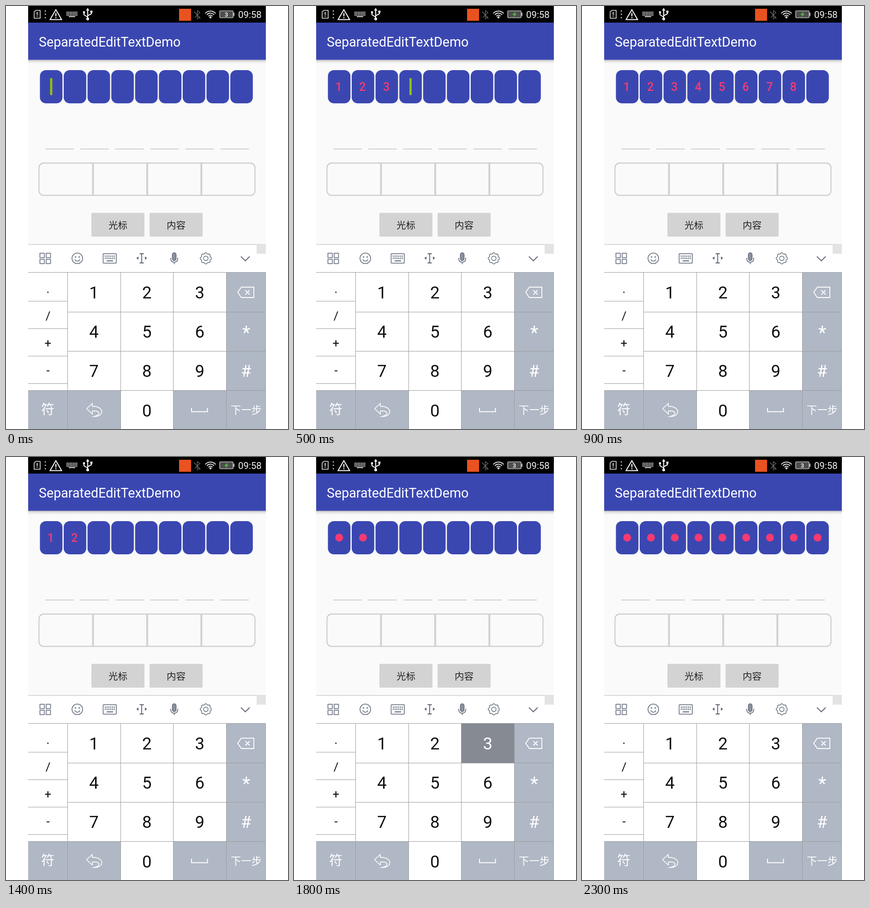
Recreate the animation shown at these times as an HTML page with a canvas. Size 611 by 917 pixels, loop 2.4 s.

```html
<!DOCTYPE html>
<html lang="zh">
<head>
<meta charset="utf-8">
<title>SeparatedEditTextDemo</title>
<style>
html, body { margin: 0; width: 100%; height: 100%; overflow: hidden; background: #fff; }
canvas { display: block; }
</style>
</head>
<body>
<canvas id="stage" width="611" height="917"></canvas>
<script>
const ctx = document.getElementById('stage').getContext('2d');
const LOOP = 2400, STEP = 100;
const BLUE = '#3b47b1', PINK = '#f93a70', GREEN = '#8fc400', KEY = '#b0b8c5', ICON = '#596273';
const LATIN = 'Roboto, sans-serif';
const HAN = '"Noto Sans CJK SC", "Noto Sans CJK", sans-serif';

// one character per step: how many cells are filled
const COUNTS = '001123457897422222246789';
const MASK_FROM = 16;
const PRESSED = { 1: '1', 6: '4', 8: '7', 11: 'del', 15: '内容', 18: '3', 22: '8' };
const LEVEL_STEPS = [0, 1, 2, 7, 11, 12, 17, 18, 22, 23];

function rect(x, y, w, h, color) {
  ctx.fillStyle = color;
  ctx.fillRect(x, y, w, h);
}

function round(x, y, w, h, r, fill, stroke, width = 1) {
  ctx.beginPath();
  ctx.roundRect(x, y, w, h, r);
  paint(fill, stroke, width);
}

function circle(x, y, r, fill, stroke, width) {
  ctx.beginPath();
  ctx.arc(x, y, r, 0, Math.PI * 2);
  paint(fill, stroke, width);
}

function path(d, fill, stroke, width = 1) {
  const p = new Path2D(d);
  if (fill) { ctx.fillStyle = fill; ctx.fill(p); }
  if (stroke) { ctx.strokeStyle = stroke; ctx.lineWidth = width; ctx.stroke(p); }
}

function paint(fill, stroke, width = 1) {
  if (fill) { ctx.fillStyle = fill; ctx.fill(); }
  if (stroke) { ctx.strokeStyle = stroke; ctx.lineWidth = width; ctx.stroke(); }
}

function text(s, x, y, size, color, font = LATIN, align = 'center', weight = 400) {
  ctx.font = `${weight} ${size}px ${font}`;
  ctx.textAlign = align;
  ctx.fillStyle = color;
  ctx.fillText(s, x, y);
}

function drawStatus(step) {
  rect(48, 0, 515, 36, '#000');
  path('M64.5 9.5H74V26.5H61V13Z', null, '#eee', 1.5);
  rect(66.6, 13, 1.8, 6.5, '#fff');
  rect(66.6, 21, 1.8, 2, '#fff');
  for (let i = 0; i < 3; i++) rect(84, 9.5 + i * 7.3, 2.4, 2.4, '#ddd');
  path('M108 8L120.5 29.5H95.5Z', null, '#fff', 2);
  rect(107, 15, 2.2, 7.5, '#fff');
  rect(107, 24.2, 2.2, 2.3, '#fff');
  for (let r = 0; r < 3; r++)
    for (let c = 0; c < 7; c++) rect(131 + c * 3.5, 12.5 + r * 3.2, 2.5, 2, '#ddd');
  rect(136, 22, 14, 2, '#ddd');

  path('M177 8V28M177 24L169 19V14M177 21L185 17V13', null, '#fff', 2);
  path('M177 4L180.5 10H173.5Z', '#fff');
  circle(177, 28, 3, '#fff');
  circle(169, 13.5, 2.3, '#fff');
  rect(182.7, 10, 4.6, 4.6, '#fff');

  rect(375, 6, 26, 26, '#e9531f');
  path('M409 14L420 25L414.5 28V10L420 14L409 25M407.5 12L421 27', null, '#6a6a6a', 1.3);

  ctx.lineCap = 'butt';
  [15, 10.5, 6].forEach(r => {
    ctx.beginPath();
    ctx.arc(443, 26, r, -Math.PI * 0.77, -Math.PI * 0.23);
    paint(null, '#ddd', 2);
  });
  circle(443, 24.5, 2.2, '#fff');

  round(463, 10.5, 29, 15, 2, '#4d4d4d', '#b9b9b9', 1.6);
  rect(492.5, 14.5, 2.5, 7, '#b9b9b9');
  if (LEVEL_STEPS.includes(step)) text('3', 477.5, 22.8, 13, '#fff', LATIN, 'center', 500);
  else path('M480 12L473 19H477L475 24.5L482.5 17H478.5Z', '#58b947');
  text('09:58', 503, 25.8, 20.4, '#f4f4f4', LATIN, 'left');
}

function drawHeader() {
  rect(48, 117, 515, 400, '#fafafa');
  const shade = ctx.createLinearGradient(0, 116, 0, 125);
  shade.addColorStop(0, '#aeaeb2');
  shade.addColorStop(0.35, '#dedee0');
  shade.addColorStop(1, '#fafafa');
  rect(48, 116, 515, 9, shade);
  rect(48, 36, 515, 80.5, BLUE);
  text('SeparatedEditTextDemo', 71, 87.5, 28.62, '#fff', LATIN, 'left');
}

function drawCells(step, time) {
  const count = +COUNTS[step];
  const cursorOn = time % 500 < 200;
  for (let i = 0; i < 9; i++) {
    const x = 73.5 + i * 51.56, mid = x + 24.4;
    round(x, 139, 48.8, 72, 13, BLUE);
    if (i < count) {
      if (step >= MASK_FROM) circle(mid, 174.8, 8.5, PINK);
      else text(i + 1, mid - 1, 183.5, 25, PINK, LATIN, 'center', 500);
    } else if (i === count && cursorOn) {
      rect(mid - 2.4, 156.5, 4.8, 36.5, GREEN);
    }
  }
}

function drawForm(step) {
  for (let i = 0; i < 6; i++) rect(85 + i * 75.9, 309, 61.8, 2, '#d0d0d0');
  round(71.5, 340.5, 468, 70, 10, null, '#cfcfcf', 2.4);
  for (let i = 1; i < 4; i++) rect(69 + i * 117.4 + 0.2, 341, 3.8, 70, '#cfcfcf');
  [['光标', 185], ['内容', 311]].forEach(([label, x]) => {
    round(x, 448.5, 115, 51.5, 2.5, PRESSED[step] === label ? '#b5b5b5' : '#d3d3d3');
    text(label, x + 57.5, 482.7, 20.5, '#202020', HAN);
  });
}

function drawToolbar() {
  rect(48, 517, 515, 400, '#fff');
  rect(48, 516.5, 515, 1, '#b8b8b8');
  rect(543, 517, 20, 20, '#e3e3e3');

  for (const x of [73.5, 87])
    for (const y of [536, 549]) round(x, y, 9.5, 9.5, 0, null, ICON, 1.5);

  circle(154.5, 547, 11.5, null, ICON, 1.5);
  circle(150.5, 544, 1.5, ICON);
  circle(158.5, 544, 1.5, ICON);
  ctx.beginPath();
  ctx.arc(154.5, 547.5, 5.8, 0.3, Math.PI - 0.3);
  paint(null, ICON, 1.5);

  round(210.5, 537, 28.5, 20.5, 1, null, ICON, 1.5);
  for (let r = 0; r < 2; r++)
    for (let c = 0; c < 6; c++) rect(214 + c * 3.9, 541 + r * 4.5, 2.2, 2.5, ICON);
  rect(218, 551.5, 14, 2, ICON);

  path('M289.5 537H298.5M294 537V557M289.5 557H298.5', null, ICON, 1.8);
  path('M287 543V550L282.5 546.5ZM301 543V550L305.5 546.5Z', ICON);

  round(360.5, 535, 8, 17, 4, '#8d94a1', ICON, 1.5);
  path('M357 546V548C357 558 372 558 372 548V546M364.5 555.5V559.5', null, ICON, 1.6);

  ctx.beginPath();
  for (let a = 0; a < 6.283; a += 0.05) {
    const r = 11.2 + Math.cos(a * 8);
    ctx.lineTo(433 + r * Math.cos(a), 547 + r * Math.sin(a));
  }
  ctx.closePath();
  paint(null, ICON, 1.4);
  circle(433, 547, 4.8, null, ICON, 1.4);
  path('M509 543L518.5 552.5L528 543', null, ICON, 1.8);
}

function drawKeypad(step) {
  const xs = [48, 133, 248, 362, 477, 563], ys = [577, 663, 748, 833, 917];
  const down = PRESSED[step];
  const cell = (c, r, color) => rect(xs[c], ys[r], xs[c + 1] - xs[c], ys[r + 1] - ys[r], color);

  for (let r = 0; r < 4; r++) cell(4, r, KEY);
  for (const c of [0, 1, 3]) cell(c, 3, KEY);
  if (down === 'del') cell(4, 0, '#858a93');

  for (let n = 0; n < 10; n++) {
    const c = n ? 1 + (n - 1) % 3 : 2, r = n ? Math.floor((n - 1) / 3) : 3;
    const held = down === String(n);
    if (held) cell(c, r, '#858a93');
    text(n, [190.5, 305.2, 419.8][c - 1], 634 + r * 85.2, 36.5, held ? '#fff' : '#111');
  }

  const line = '#9b9b9e';
  ys.slice(0, 4).forEach((y, i) => {
    const x = i % 3 ? 133 : 48;
    rect(x, y, 563 - x, 1, line);
  });
  xs.slice(1).forEach(x => rect(x - (x === 563 ? 1 : 0), 577, 1, 340, line));
  for (const y of [639.5, 699, 758.5, 818]) rect(48, y, 85, 1, line);

  [['.', 622], ['/', 681], ['+', 740], ['-', 799]].forEach(([s, y]) => text(s, 91, y, 26, '#111'));

  path('M502 620.5L510 609.5H537V632H510Z', null, '#fff', 1.8);
  path('M518.5 616L528 625.5M528 616L518.5 625.5', null, '#fff', 2);
  text('*', 520.5, 721.5, 40, '#fff');
  text('#', 520, 804, 36, '#fff');
  text('符', 90.5, 885, 29, '#fff', HAN);
  text('下一步', 520.5, 883.5, 22.3, '#fff', HAN);
  path('M174.5 873L187 861.5V868C200 867 208 874 207.5 880C207 887 199 890.5 190 890C199 888 203 884 201 881C199 878 194 877.5 187 878V884.5Z', null, '#fff', 1.6);
  path('M402 871V879.5H436.5V871', null, '#fff', 2);
}

function draw(now) {
  const time = now % LOOP, step = Math.floor(time / STEP);
  rect(0, 0, 611, 917, '#fff');
  drawStatus(step);
  drawHeader();
  drawCells(step, time);
  drawForm(step);
  drawToolbar();
  drawKeypad(step);
}

const start = performance.now();
function tick() {
  draw(performance.now() - start);
  requestAnimationFrame(tick);
}
tick();
</script>
</body>
</html>
```
